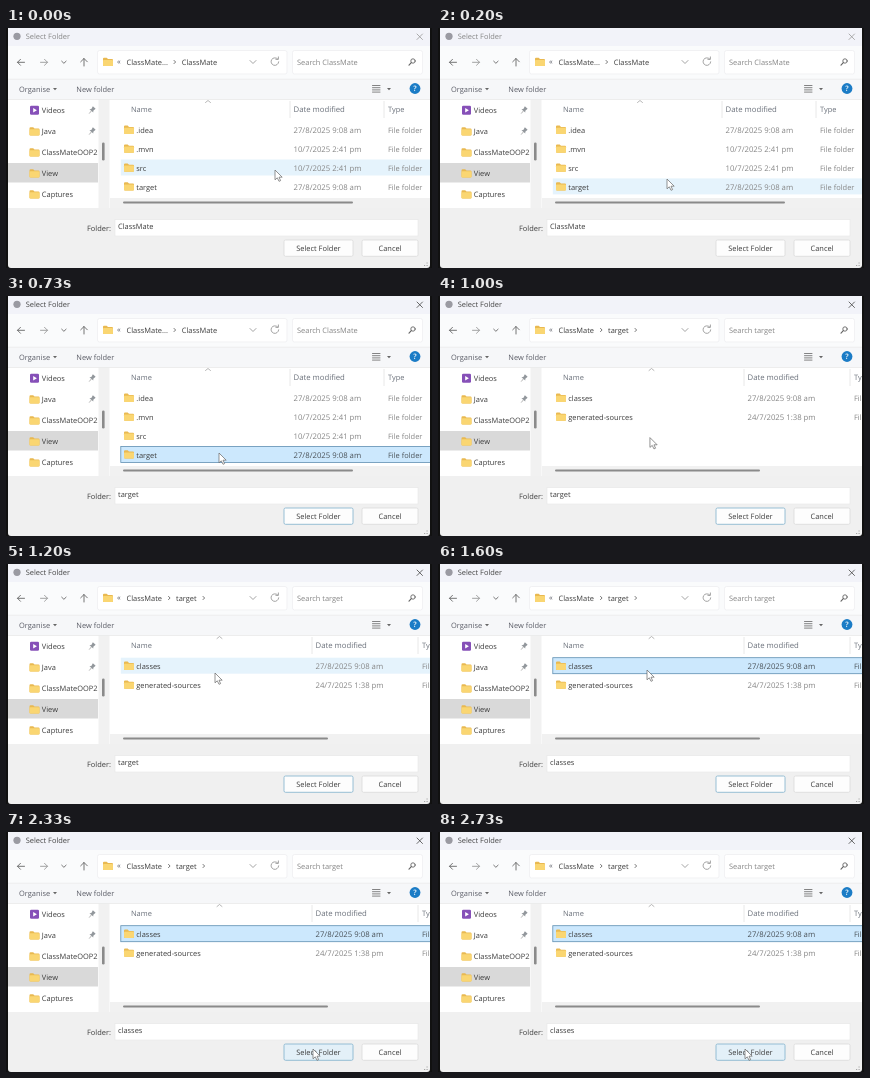
These frames come from a looping animation (426 by 240 pixels, 2790 ms). An HTML page:

```html
<!DOCTYPE html>
<html lang="en">
<head>
<meta charset="utf-8">
<title>Select Folder</title>
<style>
html, body { margin: 0; width: 100%; height: 100%; overflow: hidden; background: #111; }
svg { display: block; width: 100vw; height: 100vh; }
text { font: 7.45px "Open Sans", "Noto Sans", sans-serif; fill: #3c3c3c; text-rendering: geometricPrecision; white-space: pre; }
.dim { fill: #858585; }
.head { fill: #6a707a; }
.bar { fill: #5a5c66; }
.date { font-size: 7.75px; }
.mid { text-anchor: middle; }
.line { fill: none; stroke: #666; stroke-linecap: round; stroke-linejoin: round; }
.soft { stroke: #999; }
.rule { stroke: #e8e8e8; }
.title { fill: #858585; }
.close { stroke: #999; }
.active .title { fill: #444; }
.active .close { stroke: #444; }
.picked .dim { fill: #4a5258; }
.row { fill: none; }
.hover .row { fill: #e5f3fc; }
.picked .row { fill: #cce8fd; stroke: #5f8fb2; stroke-width: .8; }
.button { fill: #fdfdfd; stroke: #dadada; stroke-width: .8; }
.active #ok { stroke: #7fb0cc; }
</style>
</head>
<body>
<svg id="stage" viewBox="0 0 426 240" preserveAspectRatio="none"></svg>
<script>
const stage = document.getElementById('stage');
const text = (x, y, s, cls = '') => `<text x="${x}" y="${y}" class="${cls}">${s}</text>`;
const rect = (x, y, w, h, fill, extra = '') =>
  `<rect x="${x}" y="${y}" width="${w}" height="${h}" fill="${fill}" ${extra}/>`;
const line = (d, cls = '', width = .9) => `<path class="line ${cls}" d="${d}" stroke-width="${width}"/>`;
const chevron = (x, y) => line(`M${x} ${y}l1.6 1.6-1.6 1.6`);
const caret = (x, y) => `<path d="M${x} ${y}h4l-2 2.3z" fill="#666"/>`;
const folder = (x, y) => `<g transform="translate(${x} ${y})">
  <path d="M0 1q0-1 1-1h2.7l1.3 1.3h4q1 0 1 1V7.5q0 .8-1 .8H1q-1 0-1-.8z" fill="#e9b951"/>
  <path d="M0 2.8q0-.7 1-.7h8q1 0 1 .7V7.5q0 .8-1 .8H1q-1 0-1-.8z" fill="#fad672"/></g>`;
const pin = y => `<g transform="translate(86 ${y}) rotate(40)">
  <path d="M-1.8-3.5h3.6l-.5 3 1.2 1.5h-5l1.2-1.5z" fill="#92979c"/>${line('M0 1v3', 'soft', .7)}</g>`;

const ROW_TOP = 93.7, ROW_STEP = 18.9;

function fileList(id, dateX, typeX, sortX, barEnd, files) {
  const rows = files.map(([name, date], i) => {
    const y = ROW_TOP + i * ROW_STEP;
    return `<g class="file">${rect(114.8, y, 312, 16, 'none', 'class="row"')}
      ${folder(118, y + 3.9)}${text(130.3, y + 11.6, name)}
      ${text(dateX, y + 11.6, date, 'dim date')}${text(typeX, y + 11.6, 'File folder', 'dim')}</g>`;
  }).join('');
  return `<g id="${id}">
    <path class="rule" d="M${dateX - 3.5} 73v17M${typeX - 4} 73v17"/>
    ${line(`M${sortX - 2.5} 74.5l2.5-2 2.5 2`, 'soft', .7)}
    ${text(125, 84, 'Name', 'head')}${text(dateX, 84, 'Date modified', 'head date')}
    ${text(typeX, 84, 'Type', 'head')}${rows}
    ${rect(117, 173.6, barEnd - 117, 2, '#8a8a8a', 'rx="1"')}</g>`;
}

const places = [['Videos', 82.2], ['Java', 103.2], ['ClassMateOOP2', 124.2], ['View', 145.2], ['Captures', 166.2]];

stage.innerHTML = `
<clipPath id="window"><rect x="2" y="-4" width="422" height="244" rx="3"/></clipPath>
<clipPath id="side"><rect x="2" y="72" width="90" height="108"/></clipPath>
${rect(0, 0, 426, 240, '#111')}
<g clip-path="url(#window)">
  ${rect(2, 0, 422, 240, '#f0f0f0')}
  ${rect(2, 0, 422, 18, '#f2f3f9')}
  ${rect(2, 18, 422, 33, '#fafbfc')}
  ${rect(2, 51, 422, 20.5, '#f6f7f9')}
  ${rect(2, 71.5, 422, 108.5, '#fff')}
  ${rect(92.5, 71.5, 11, 108.5, '#f1f1f1')}
  ${rect(104, 170, 320, 10, '#f1f1f1')}
  <path class="rule" d="M2 51.2H424M2 71.5H424" stroke-width=".7"/>
  <circle cx="11" cy="8.3" r="3.6" fill="#9a9aa2"/>
  ${text(19.7, 11.2, 'Select Folder', 'title')}
  ${line('M411 6l5.5 5.5m0-5.5l-5.5 5.5', 'close', .8)}

  ${line('M18.5 34.3h-7m3-3l-3 3 3 3')}
  ${line('M34.5 34.3h7m-3-3l3 3-3 3', 'soft')}
  ${line('M55.7 33.2l2.2 2.1 2.2-2.1')}
  ${line('M78 38v-7.5m-3.3 3.3l3.3-3.3 3.3 3.3')}
  ${rect(91.5, 22.5, 189.5, 23.5, '#fff', 'rx="2" stroke="#ececf0" stroke-width=".7"')}
  ${rect(286.5, 22.5, 130, 23.5, '#fff', 'rx="2" stroke="#ececf0" stroke-width=".7"')}
  ${folder(97, 29.8)}${text(111, 36.3, '«', 'bar')}
  <g id="pathA">${text(120.5, 36.8, 'ClassMate...')}${chevron(168, 32.4)}${text(175.7, 36.8, 'ClassMate')}
    ${text(291, 36.8, 'Search ClassMate', 'dim')}</g>
  <g id="pathB">${text(120.5, 36.8, 'ClassMate')}${chevron(162.5, 32.4)}${text(170, 36.8, 'target')}${chevron(197, 32.4)}
    ${text(291, 36.8, 'Search target', 'dim')}</g>
  ${line('M244 32.5l3 3 3-3', 'soft')}
  ${line('M271.7 31a3.8 3.8 0 1 0 1 2.8M272.4 28.9v2.5h-2.5', 'soft')}
  <circle class="line" cx="407" cy="33" r="2.2" stroke-width=".9"/>${line('M405.3 34.7l-2.3 2.4', '', 1.2)}

  ${text(13, 63.8, 'Organise', 'bar')}${caret(47, 60)}${text(70.3, 63.8, 'New folder', 'bar')}
  ${line('M366.5 57.5h7.5m-7.5 2.2h7.5m-7.5 2.2h7.5m-7.5 2.2h7.5', '', .8)}${caret(381, 60)}
  <circle cx="409" cy="60.5" r="5.4" fill="#1b7cc6"/>
  <text x="409" y="63.3" class="mid" style="fill:#fff;font-weight:600">?</text>

  <g clip-path="url(#side)">
    ${rect(2, 135, 90, 19.5, '#d9d9d9')}
    ${places.map(([name, y], i) => (i ? folder(23.5, y - 4) : '') + text(35.8, y + 3, name)).join('')}
    ${rect(24, 77.7, 9, 9, '#8650b8', 'rx="1.3"')}<path d="M27.2 80v4.4l3.7-2.2z" fill="#fff"/>
    ${pin(82.2)}${pin(103.2)}
  </g>
  ${rect(96, 114.5, 2.6, 18, '#8a8a8a', 'rx="1.3"')}
  ${fileList('listA', 287.5, 382, 202, 347, [
    ['.idea', '27/8/2025 9:08 am'], ['.mvn', '10/7/2025 2:41 pm'],
    ['src', '10/7/2025 2:41 pm'], ['target', '27/8/2025 9:08 am']])}
  ${fileList('listB', 309.5, 416, 213.5, 322, [
    ['classes', '27/8/2025 9:08 am'], ['generated-sources', '24/7/2025 1:38 pm']])}

  ${text(81, 202.7, 'Folder:')}
  ${rect(109, 191.5, 303, 16.5, '#fff', 'stroke="#e6e6e6" stroke-width=".6"')}
  <text id="field" x="112" y="201.4"></text>
  ${rect(278, 212, 69, 16.3, '', 'id="ok" class="button" rx="1.5"')}
  ${rect(356, 212, 56, 16.3, '', 'class="button" rx="1.5"')}
  ${text(312.4, 223, 'Select Folder', 'mid')}${text(384, 223, 'Cancel', 'mid')}
  <path d="M418 237.5h1.2m1.3 0h1.2m-1.2-2.5h1.2" stroke="#a5a5a5" stroke-width="1.2"/>
  <path id="cursor" d="M0 0V9.8L2.3 7.8 4 11.3 5.6 10.6 4 7.2H7.2Z" fill="#fff" stroke="#666" stroke-width=".7"/>
</g>`;

const $ = id => document.getElementById(id);
const LOOP = 2790, FRAME = 200 / 3;
const SELECT_TARGET = 600, OPEN_TARGET = 930, SELECT_CLASSES = 1460;
// time, x, y
const path = [
  [0, 269, 142], [70, 260, 144], [200, 229, 151], [400, 215, 156], [600, 213, 157],
  [930, 213, 157], [1130, 210, 113], [1200, 209, 109], [1330, 209, 106],
  [1660, 209, 106], [1870, 246, 148], [2070, 298, 206], [2200, 307, 217], [2790, 307, 217]
];

function pointerAt(t) {
  const i = path.findIndex(p => p[0] > t);
  const [t0, x0, y0] = path[i - 1], [t1, x1, y1] = path[i];
  const k = (t - t0) / (t1 - t0);
  return [x0 + (x1 - x0) * k, y0 + (y1 - y0) * k];
}

function draw(elapsed) {
  const t = Math.floor((elapsed % LOOP + 4) / FRAME) * FRAME;
  const [x, y] = pointerAt(t);
  const opened = t >= OPEN_TARGET;
  const picked = opened ? (t >= SELECT_CLASSES ? 0 : -1) : (t >= SELECT_TARGET ? 3 : -1);
  const hovered = Math.floor((y - ROW_TOP + 1) / ROW_STEP);

  stage.classList.toggle('active', t >= SELECT_TARGET);
  for (const [name, shown] of [['A', !opened], ['B', opened]]) {
    $('list' + name).style.display = $('path' + name).style.display = shown ? '' : 'none';
    $('list' + name).querySelectorAll('.file').forEach((row, i) => {
      row.classList.toggle('picked', i === picked);
      row.classList.toggle('hover', i === hovered);
    });
  }
  $('field').textContent = t < SELECT_TARGET ? 'ClassMate' : t < SELECT_CLASSES ? 'target' : 'classes';
  const overButton = x > 278 && x < 347 && y > 212;
  $('ok').style.fill = overButton ? '#e3f0f8' : '';
  $('cursor').setAttribute('transform', `translate(${x} ${y})`);
}

const start = performance.now();
function tick() {
  draw(performance.now() - start);
  requestAnimationFrame(tick);
}
tick();
</script>
</body>
</html>
```
